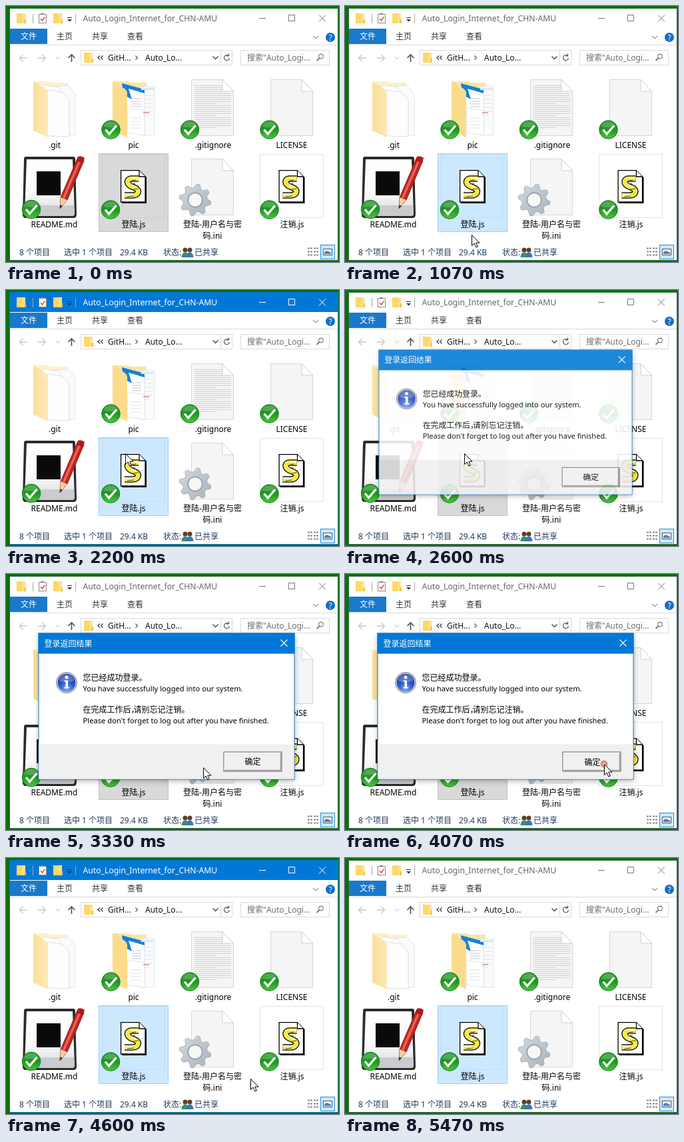
These frames come from a looping animation (500 px wide and 384 px high, 6070 ms). An HTML page:

```html
<!DOCTYPE html>
<html lang="zh-CN">
<head>
<meta charset="utf-8">
<title>Auto login</title>
<style>
html, body { margin: 0; width: 100%; height: 100%; overflow: hidden; background: #0d6f0d; }
svg { display: block; width: 100vw; height: 100vh; }
text { font: 12px "Noto Sans", "Noto Sans CJK SC", "Noto Sans CJK", sans-serif; white-space: pre; }
.mid { text-anchor: middle; }
.latin { font-size: 11.2px; }
.line { fill: none; stroke: #555; }
</style>
</head>
<body>
<svg id="stage" viewBox="0 0 500 384" xmlns="http://www.w3.org/2000/svg">
<defs>
  <linearGradient id="green" x2="0" y2="1">
    <stop offset="0" stop-color="#2f9a30"/><stop offset=".5" stop-color="#1d9722"/><stop offset="1" stop-color="#4fc63f"/>
  </linearGradient>
  <radialGradient id="ball" cx=".5" cy=".85" r=".85">
    <stop offset="0" stop-color="#7aa7f5"/><stop offset=".5" stop-color="#2a55c8"/><stop offset="1" stop-color="#16339a"/>
  </radialGradient>
  <linearGradient id="steel" x2="1" y2="1">
    <stop offset="0" stop-color="#d3d9df"/><stop offset="1" stop-color="#a9b3bc"/>
  </linearGradient>
  <linearGradient id="tray" x2="0" y2="1">
    <stop offset="0" stop-color="#fff"/><stop offset=".6" stop-color="#fafafa"/><stop offset="1" stop-color="#d4d6da"/>
  </linearGradient>
  <linearGradient id="flap" x2="1">
    <stop offset="0" stop-color="#fbdf97"/><stop offset="1" stop-color="#fdeaba"/>
  </linearGradient>
  <filter id="soft" x="-10%" y="-10%" width="120%" height="125%"><feGaussianBlur stdDeviation="4"/></filter>
  <g id="badge">
    <circle r="13.800" fill="url(#green)" stroke="#187c1e"/>
    <path d="M-11-5A12 12 0 0 1 11-5Q0-2-11-5Z" fill="#fff" opacity=".18"/>
    <path d="M-8 0L-2.500 6.500L8.500-6" fill="none" stroke="#fff" stroke-width="3.400"/>
  </g>
  <g id="small-folder">
    <path d="M0 0H13V15H0Z" fill="#ffe08a"/><path d="M0 0H7L8 2V15H0Z" fill="#ffd765"/><path d="M12 9H14V15H11Z" fill="#f5c24a"/>
  </g>
  <g id="page">
    <path d="M.5.5H47L63.500 18V84.500H.5Z" fill="#f5f5f5" stroke="#d6d6d6"/>
    <path d="M47 .5V18H63.500Z" fill="#fff" stroke="#d0d0d0"/>
  </g>
  <g id="script">
    <path d="M2 2H30L39 11V50H2Z" fill="#000"/>
    <path d="M.6.600H28L37 10V48H.6Z" fill="#fff" stroke="#000" stroke-width="1.300"/>
    <path d="M28 .6V10H37" fill="#fff" stroke="#000" stroke-width="1.300"/>
    <g fill="none" stroke-linejoin="round">
      <path id="scroll" d="M27 13H16Q9 14 11 20Q13 24 20 26Q28 29 26 34Q24 38 18 38H6"/>
      <use href="#scroll" stroke="#000" stroke-width="9.500"/>
      <use href="#scroll" stroke="#f4e94a" stroke-width="7"/>
      <path d="M26 12H16M14 20Q18 24 23 26M7 37H19" stroke="#fffde0" stroke-width="2"/>
      <path d="M16 16L23 15M15 21L22 20M19 29L27 28M10 40L20 39" stroke="#55500e"/>
    </g>
  </g>
</defs>
<rect width="500" height="384" fill="#0d6f0d"/>
<g id="window"></g>
<g id="dialog"></g>
<circle id="ring" fill="none" stroke="#d42e2e" stroke-width="4" opacity=".52"/>
<path id="cursor" d="M.5.500V16.500L4.200 13L6.800 19L9.300 18L6.800 12.200H12Z" fill="#fff" stroke="#000" stroke-linejoin="round"/>
</svg>
<script>
const $ = id => document.getElementById(id);
const set = (id, attrs) => { for (const a in attrs) $(id).setAttribute(a, attrs[a]); };
const text = (x, y, s, fill = '#111', cls = '') => `<text x="${x}" y="${y}" fill="${fill}" class="${cls}">${s}</text>`;
const label = (x, y, s) => text(x, y, s, '#000', 'mid');
const rect = (x, y, w, h, fill, more = '') => `<rect x="${x}" y="${y}" width="${w}" height="${h}" fill="${fill}" ${more}/>`;
const line = (d, color = '#555', w = 1) => `<path class="line" d="${d}" style="stroke:${color};stroke-width:${w}"/>`;
const shape = (d, fill, stroke = 'none') => `<path d="${d}" fill="${fill}" stroke="${stroke}"/>`;
const use = (id, x, y) => `<use href="#${id}" x="${x}" y="${y}"/>`;

function gear(x, y, r, teeth) {
  const pts = [];
  for (let i = 0; i < teeth * 4; i++) {
    const a = (i + .5) / (teeth * 4) * Math.PI * 2;
    const d = i % 4 < 2 ? r : r * .76;
    pts.push(`${(x + d * Math.cos(a)).toFixed(1)},${(y + d * Math.sin(a)).toFixed(1)}`);
  }
  return `<polygon points="${pts.join(' ')}" fill="url(#steel)" stroke="#9aa5ae" stroke-width=".8"/>
    <circle cx="${x}" cy="${y}" r="${r * .45}" fill="#f8f8f8" stroke="#9ca7b0" stroke-width="2"/>`;
}

function stripes(x, y, w, count, gap, color) {
  let d = '';
  for (let i = 0; i < count; i++) d += `M${x} ${y + i * gap}h${i % 6 === 5 ? w * .6 : w}`;
  return line(d, color);
}

const frame = rect(5.5, 3.5, 493, 378, '#fff', 'id="edge"') + rect(6, 4, 492, 29, '#fff', 'id="bar"');

const titleBar = use('small-folder', 16, 11) + line('M40.500 12V26', '#a5a5a5')
  + rect(49.5, 12.5, 11, 13, '#fff', 'stroke="#888"') + rect(52, 11, 5, 2, '#888')
  + line('M52 19L54.500 22L58.500 16.500', '#d8552f', 1.4)
  + use('small-folder', 71, 11)
  + line('M92 17.500H99', '#333') + shape('M92 20H99L95.500 23.500Z', '#333')
  + line('M104.500 12V26', '#a5a5a5')
  + '<text id="title" x="115.500" y="23" style="font-size:12.200px">Auto_Login_Internet_for_CHN-AMU</text>'
  + '<path id="caption" fill="none" d="M380 18.500H390M424.500 13.500H433.500V22.500H424.500ZM470 13.500L480 23.500M480 13.500L470 23.500"/>';

const ribbon = rect(6, 34, 56, 23, '#1979ca') + text(22, 50, '文件', '#fff')
  + text(76, 50, '主页', '#333') + text(129, 50, '共享', '#333') + text(182, 50, '查看', '#333')
  + line('M461 45L465 49L469 45', '#999', 1.2)
  + '<circle cx="487" cy="47" r="7" fill="#0f6fc6"/>' + text(487, 51.5, '?', '#fff', 'mid')
  + line('M6 58.500H498', '#dadbdc');

const address = line('M32 78H20.500M25.500 73L20.500 78L25.500 83M48 78H59.500M54.500 73L59.500 78L54.500 83', '#c9c9c9', 1.4)
  + line('M75 76.500L78 79.500L81 76.500', '#aaa')
  + line('M98.500 84V73M93.500 78L98.500 73L103.500 78', '#555', 1.7)
  + rect(112.5, 66.5, 227, 22, '#fff', 'stroke="#d9d9d9"') + use('small-folder', 117, 70)
  + line('M141 74.500L138 77.500L141 80.500M145.500 74.500L142.500 77.500L145.500 80.500', '#333', 1.2)
  + text(153, 82, 'GitH...') + line('M194.500 74.500L197.500 77.500L194.500 80.500', '#555', 1.2)
  + text(209, 82, 'Auto_Lo...')
  + line('M310.500 75.500L314.500 79.500L318.500 75.500', '#444', 1.3) + line('M322.500 67V89', '#d9d9d9')
  + line('M334 74.500A4 4 0 1 0 335.500 78M334.500 71.500V75H331', '#555', 1.2)
  + rect(352.5, 66.5, 133, 22, '#fff', 'stroke="#d9d9d9"')
  + text(362, 82, '搜索"Auto_Logi...', '#6d6d6d')
  + '<circle class="line" cx="473" cy="75.500" r="3.500"/>' + line('M470.500 78L466.500 82', '#555', 1.4);

const gitFolder = shape('M43 113H64L67 115H93V188H43Z', '#fdf0cb')
  + shape('M70 121L93 119L104 132V194L70 195Z', '#fbfbfb', '#e3e3e3')
  + shape('M56 118L78 122L88 134V193H56Z', '#fff', '#e3e3e3')
  + shape('M62 126L84 129L95 141V196L62 195Z', '#fdfdfd', '#dedede')
  + shape('M41 113L59 124Q62 126 63 130V197L41 187Z', 'url(#flap)');

const picFolder = shape('M162 113H183L186 115H211V187H162Z', '#fbe3a3')
  + shape('M203 121H223V194H203Z', '#fbfbfb', '#dfe5ea')
  + shape('M174 117L208 126V188L174 186Z', '#fff', '#dde3e8')
  + shape('M174 116L208 125V131L184 124L189 140L176 133Z', '#1680d9')
  + stripes(188, 139, 15, 4, 4, '#c3cad2')
  + shape('M182 153L208 157V194L182 190Z', '#fff', '#dfe5ea')
  + rect(203, 123, 20, 3, '#d7e9f8') + stripes(207, 134, 14, 6, 6, '#dde4ec')
  + line('M206 160H215', '#d98a84', 1.5) + stripes(187, 168, 16, 4, 5, '#dfe3e8')
  + shape('M160 113L178 124Q181 126 182 130V197L160 187Z', '#fbdb8c');

const readme = shape('M30 226H101Q104 226 104 229L106 313Q106 318 101 318H30Q25 318 25 313L27 229Q27 226 30 226Z', '#2b2b2b')
  + shape('M31 230H100L103 311Q103 315 99 315H32Q28 315 28 311Z', 'url(#tray)')
  + rect(46, 248, 36, 36, '#0a0a0a')
  + shape('M29 299H102L103 311Q103 315 99 315H32Q28 315 28 311Z', '#c9cbcf')
  + '<path d="M107 229L117 232L92 291L81 304L82 287Z" fill="#c2261f" stroke="#7d1110" stroke-width=".8"/>'
  + shape('M110 230L85 287L88 289L113 231Z', '#e8665a')
  + shape('M82 287L92 291L81 304Z', '#efd0a0') + shape('M81.500 298L84.500 300L81 304Z', '#222')
  + shape('M105 232L108 226Q113 224 118 228L116 236Z', '#b31b1b');

const people = (x, color) => `<circle cx="${x}" cy="366" r="3.500" fill="#5d4026"/>` + shape(`M${x - 5.5} 377Q${x - 5} 369.500 ${x} 369.500T${x + 5.5} 377Z`, color);

const files = rect(139.5, 221.5, 104, 117, '#d9d9d9', 'id="picked"')
  + rect(377, 221, 104, 118, '#e5f3ff', 'id="hover"')
  + gitFolder + label(73, 213, '.git')
  + picFolder + use('badge', 157.5, 185.5) + label(191.5, 213, 'pic')
  + use('page', 278, 110) + stripes(283, 119.5, 42, 4, 3, '#d0d0d0') + stripes(283, 131.5, 55, 18, 3, '#d0d0d0')
  + use('badge', 276, 185.5) + label(311, 213, '.gitignore')
  + use('page', 397, 110) + use('badge', 395.5, 185.5) + label(429, 213, 'LICENSE')
  + readme + use('badge', 38, 305) + label(72.5, 332, 'README.md')
  + rect(144.5, 222.5, 94, 95, 'none', 'stroke="#000" stroke-opacity=".05"')
  + use('script', 172, 246) + use('badge', 157, 305.5) + label(191.5, 332, '登陆.js')
  + use('page', 278, 229) + gear(284, 291, 24, 8)
  + label(310, 332, '登陆-用户名与密') + label(310, 349, '码.ini')
  + rect(381.5, 222.5, 95, 95, '#fff', 'id="thumb" stroke="#e3e3e3"')
  + use('script', 409.5, 246) + use('badge', 395.5, 305.5) + label(429.5, 332, '注销.js');

const status = text(20, 374, '8 个项目', '#1e395b') + text(87, 374, '选中 1 个项目', '#1e395b')
  + text(171, 374, '29.4 KB', '#1e395b') + text(236, 374, '状态:', '#1e395b')
  + people(269, '#3b8f6d') + people(276, '#3a78b2') + text(283, 374, '已共享', '#1e395b')
  + [364, 369, 374].map(y => line(`M453 ${y - .5}H456M457 ${y - .5}H460M462 ${y - .5}H465M466 ${y - .5}H469`, '#8a8a8a', 2)).join('')
  + rect(472.5, 358.5, 21, 21, '#cce8ff', 'stroke="#2a8dd4"')
  + rect(476.5, 364.5, 13, 9, '#fff', 'stroke="#555"') + shape('M478 372V369L482 367L488 370V372Z', '#3b87c4');

$('window').innerHTML = frame + titleBar + ribbon + address + files + status;

$('dialog').innerHTML = rect(50, 92, 384, 219, '#000', 'opacity=".3" filter="url(#soft)"')
  + rect(49.5, 89.5, 384, 219, '#fff', 'stroke="#1573bd"')
  + rect(49, 89, 385, 31, '#0078d7') + text(58, 109, '登录返回结果', '#fff')
  + '<path id="close" d="M413 99L423 109M423 99L413 109" stroke="#fff" stroke-width="1.100"/>'
  + rect(50, 256, 383, 52, '#f0f0f0')
  + '<circle cx="91.500" cy="163.500" r="15.500" fill="#c6cbd3" stroke="#7d848e"/><circle cx="91.500" cy="163.500" r="13.300" fill="url(#ball)"/>'
  + shape('M80 160A11.800 11.800 0 0 1 103 160Q91 166 80 160Z', '#ffffff40')
  + '<circle cx="91.500" cy="155.500" r="2.500" fill="#fff"/>' + shape('M88 160H93.500V170H95.500V172H88V170H90V162H88Z', '#fff')
  + text(116, 160, '您已经成功登录。', '#000')
  + text(116, 176, 'You have successfully logged into our system.', '#000', 'latin')
  + text(116, 208, '在完成工作后', '#000') + text(188, 208, '，', '#000') + text(192, 208, '请别忘记注销。', '#000')
  + text(116, 224, "Please don't forget to log out after you have finished.", '#000', 'latin')
  + rect(327, 267, 88, 30, '#5f5f5f') + rect(328, 268, 86, 28, '#fff')
  + shape('M328 296H414V268L412 270V294H330Z', '#9a9a9a') + rect(329.5, 269.5, 82.5, 24.5, '#f0f0f0')
  + '<text id="ok" x="371" y="286" class="mid">确定</text>';

const LOOP = 6070, TICK = 1000 / 15;
const ease = u => 1 - (1 - u) ** 2;
const clamp = u => Math.min(1, Math.max(0, u));
const mix = (a, b, u) => a.map((v, i) => v + (b[i] - v) * u);
const show = on => on ? 'visible' : 'hidden';

// Pointer stops: [tick, x, y]
const HOP = [[49, 179, 245], [50, 296, 290], [51, 345, 303], [52, 376, 301], [53, 391, 296], [54, 393, 292], [57, 389, 285]];

function pointer(k) {
  if (k < 50) return mix([190, 343], [179, 245], ease(clamp((k - 16) / 4)));
  if (k >= 57) return mix([389, 285], [367, 331], ease(clamp((k - 64) / 5)));
  const i = HOP.findIndex(p => p[0] > k), a = HOP[i - 1], b = HOP[i];
  return mix(a, b, (k - a[0]) / (b[0] - a[0])).slice(1);
}

function dialogState(k) {
  if (k < 37 || k > 64) return [0, 1];
  if (k < 62) {
    const left = 1 - clamp((k - 36) / 5);
    return [1 - left ** 2.3, 1 - .1 * left ** 2.5];
  }
  return [1 - .37 * (k - 62), 1 - .016 * (k - 62)];
}

function draw(ms) {
  const k = Math.floor((ms % LOOP + 5) / TICK);
  const modal = k >= 37 && k < 62;
  const active = k >= 23 && k < 82 && !modal;
  const blue = k >= 16 && !modal;
  const [x, y] = pointer(k);
  const hover = k >= 62 && k < 70 && x > 378;

  set('edge', { stroke: active ? '#0078d7' : '#2f6b35' });
  set('bar', { fill: active ? '#0078d7' : '#fff' });
  set('title', { fill: active ? '#fff' : '#666' });
  set('caption', { stroke: active ? '#fff' : '#777' });
  set('picked', { fill: blue ? '#cce8ff' : '#d9d9d9', stroke: blue ? '#99d1ff' : '#c4c4c4' });
  set('hover', { visibility: show(hover) });
  set('thumb', { fill: hover ? 'none' : '#fff', stroke: hover ? '#dcebf7' : '#e3e3e3' });

  const [alpha, size] = dialogState(k);
  set('dialog', { opacity: alpha, transform: `translate(241 198.500) scale(${size}) translate(-241.500 -199)` });
  set('close', { visibility: show(k < 62) });
  set('ok', { transform: k === 60 || k === 61 ? 'translate(1 1)' : '' });

  const start = k < 40 ? 24 : 60, n = k - start;
  const [cx, cy] = pointer(start);
  set('ring', { cx, cy, r: Math.max(0, 3.5 * n), visibility: show(n > 0 && n < 9) });
  set('cursor', { transform: `translate(${x} ${y})`, opacity: k < 16 ? 0 : clamp(1 - (k - 69) / 4) });
}

const begin = performance.now();
function loop() {
  draw(performance.now() - begin);
  requestAnimationFrame(loop);
}
loop();
</script>
</body>
</html>
```
